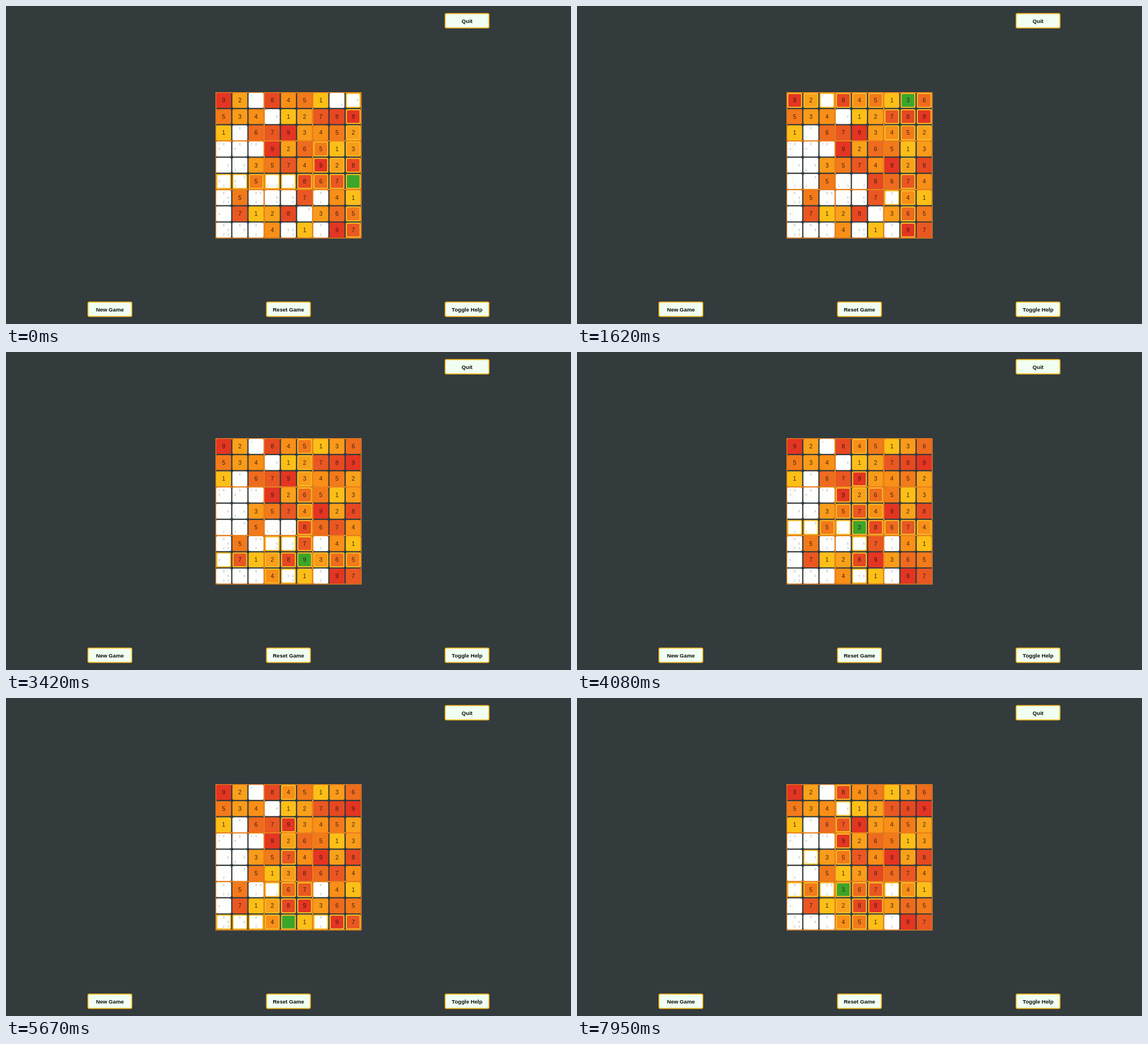
An HTML page with a canvas that plays this animation: 998 by 561 pixels, repeating every 8000 ms.

```html
<!DOCTYPE html>
<html lang="en">
<head>
<meta charset="utf-8">
<title>Number grid</title>
<style>
  html, body { margin: 0; width: 100%; height: 100%; overflow: hidden; background: #333b3d; }
  canvas { display: block; width: 998px; height: 561px; }
</style>
</head>
<body>
<canvas id="stage" width="998" height="561"></canvas>
<script>
const ctx = document.getElementById('stage').getContext('2d');
const LOOP = 8000;
const LEFT = 370.2, TOP = 152.2, PITCH = 28.6, CELL = 26.4;
const FONT = '"Liberation Sans", Arial, sans-serif';
const YELLOW = '#fcbd24', ORANGE = '#e8801c';
const FILLS = ['#fefefc', '#fdbf17', '#faa11b', '#fa9b1a', '#f98f17', '#f37a1a',
               '#ef6b1e', '#ea5722', '#e74822', '#e43522'];

const START = ['92.8451..', '534.12789', '1.6793452', '...926513', '..3574928',
               '..5..867.', '.5...7.41', '.7128.365', '...4.1.97'];
// Candidates of the empty cells, row by row from the left.
const NOTES = ['7 3 6', '6', '8', '784 84 78', '6 61', '42 941 13 3 4',
               '8623 892 63 63 82', '4 9', '8623 86 82 563 82'];

// [time, action, row, column, digit]
const EVENTS = [
  [0, 'select', 5, 8], [180, 'type', 5, 8, 4],
  [480, 'press', 0, 8], [600, 'select', 0, 8], [870, 'type', 0, 8, 6],
  [900, 'press', 0, 7], [990, 'select', 0, 7], [1350, 'type', 0, 7, 3],
  [1620, 'hover', 6, 6], [1650, 'press', 6, 6], [1740, 'select', 6, 6],
  [2280, 'hover', 7, 5], [2400, 'press', 7, 5], [2490, 'select', 7, 5], [2880, 'type', 7, 5, 9],
  [3660, 'hover', 5, 4], [3810, 'press', 5, 4], [3900, 'select', 5, 4], [4080, 'type', 5, 4, 3],
  [4320, 'press', 5, 3], [4410, 'select', 5, 3], [4620, 'type', 5, 3, 1],
  [4710, 'hover', 6, 4], [4740, 'press', 6, 4], [4860, 'select', 6, 4], [5190, 'type', 6, 4, 6],
  [5520, 'press', 8, 4], [5610, 'select', 8, 4], [5970, 'type', 8, 4, 5],
  [6000, 'press', 6, 3], [6120, 'select', 6, 3], [6240, 'type', 6, 3, 3],
  [6930, 'hover', 7, 0], [7080, 'leave'],
  [7290, 'hover', 8, 0], [7380, 'hover', 8, 1], [7470, 'hover', 8, 2], [7560, 'leave'],
  [7650, 'hover', 5, 1], [7710, 'hover', 4, 1], [7770, 'hover', 3, 1],
  [7830, 'hover', 3, 0], [7890, 'hover', 4, 0], [7950, 'hover', 4, 1]
];

const box = n => Math.floor(n / 3);
const same = (cell, r, c) => cell && cell[0] === r && cell[1] === c;
const sees = (cell, r, c) => cell[0] === r || cell[1] === c ||
  (box(cell[0]) === box(r) && box(cell[1]) === box(c));

function stateAt(time) {
  const grid = START.map((row, r) => {
    const pending = NOTES[r].split(' ');
    return [...row].map(ch => ch === '.'
      ? { digit: 0, notes: [...pending.shift()].map(Number) }
      : { digit: +ch, notes: [] });
  });
  let selected, hovered = null, pressed = null;
  for (const [at, action, r, c, digit] of EVENTS) {
    if (at > time) break;
    if (action === 'leave') hovered = null;
    else if (action === 'hover') hovered = [r, c];
    else if (action === 'press') { hovered = null; pressed = [r, c]; }
    else if (action === 'select') { selected = [r, c]; hovered = pressed = null; }
    else {
      grid[r][c] = { digit, notes: [] };
      grid.forEach((row, y) => row.forEach((cell, x) => {
        if (sees([r, c], y, x)) cell.notes = cell.notes.filter(n => n !== digit);
      }));
    }
  }
  return { grid, selected, hovered, pressed };
}

function roundRect(x, y, w, h, radius, fill) {
  ctx.fillStyle = fill;
  ctx.beginPath();
  ctx.roundRect(x, y, w, h, radius);
  ctx.fill();
}

function text(str, x, y, size, color, weight = '') {
  ctx.font = `${weight} ${size}px ${FONT}`;
  ctx.fillStyle = color;
  ctx.fillText(str, x, y);
}

function drawButton(label, x, y) {
  roundRect(x - 39.5, y - 13.5, 79, 27, 3, YELLOW);
  roundRect(x - 37.7, y - 11.7, 75.4, 23.4, 2, '#f0fff2');
  text(label, x, y + 3.5, 9.6, '#0a0a0a', 'bold');
}

function drawFrame() {
  const size = PITCH * 9;
  ctx.strokeStyle = ORANGE;
  ctx.lineWidth = 1.8;
  ctx.strokeRect(LEFT + 0.7, TOP + 0.7, size - 1, size - 1);
  ctx.lineWidth = 3;
  ctx.beginPath();
  for (const k of [3, 6]) {
    const d = k * PITCH;
    ctx.moveTo(LEFT + d, TOP);
    ctx.lineTo(LEFT + d, TOP + size);
    ctx.moveTo(LEFT, TOP + d);
    ctx.lineTo(LEFT + size, TOP + d);
  }
  ctx.stroke();
}

function drawCell(cell, r, c, state) {
  const cx = LEFT + (c + 0.5) * PITCH, cy = TOP + (r + 0.5) * PITCH;
  const isPressed = same(state.pressed, r, c), isSelected = same(state.selected, r, c);
  const lit = isPressed || same(state.hovered, r, c) || sees(state.selected, r, c);
  const fill = isPressed ? '#ae9228' : isSelected ? '#3ba62a' : FILLS[cell.digit];
  const half = CELL / 2;
  roundRect(cx - half, cy - half, CELL, CELL, 2.5, lit ? YELLOW : fill);
  if (lit) roundRect(cx - half + 2, cy - half + 2, CELL - 4, CELL - 4, 1.5, fill);

  if (cell.digit) text(cell.digit, cx, cy + 3.7, 10.5, 'rgba(45,25,15,0.9)');
  const noteColor = isPressed || isSelected ? 'rgba(120,120,120,0.2)' : '#aaa';
  for (const n of cell.notes) {
    const col = (n - 1) % 3 - 1, row = 1 - box(n - 1);
    text(n, cx + col * 8, cy + row * 7.9 + 1.9, 5.5, noteColor);
  }
}

function draw(time) {
  const state = stateAt(time);
  ctx.fillStyle = '#333b3d';
  ctx.fillRect(0, 0, 998, 561);
  ctx.textAlign = 'center';
  drawFrame();
  state.grid.forEach((row, r) => row.forEach((cell, c) => drawCell(cell, r, c, state)));
  drawButton('Quit', 814.4, 26);
  drawButton('New Game', 183.5, 535);
  drawButton('Reset Game', 498.9, 535);
  drawButton('Toggle Help', 814.4, 535);
}

const begun = performance.now();
function tick() {
  draw((performance.now() - begun) % LOOP);
  requestAnimationFrame(tick);
}
tick();
</script>
</body>
</html>
```
